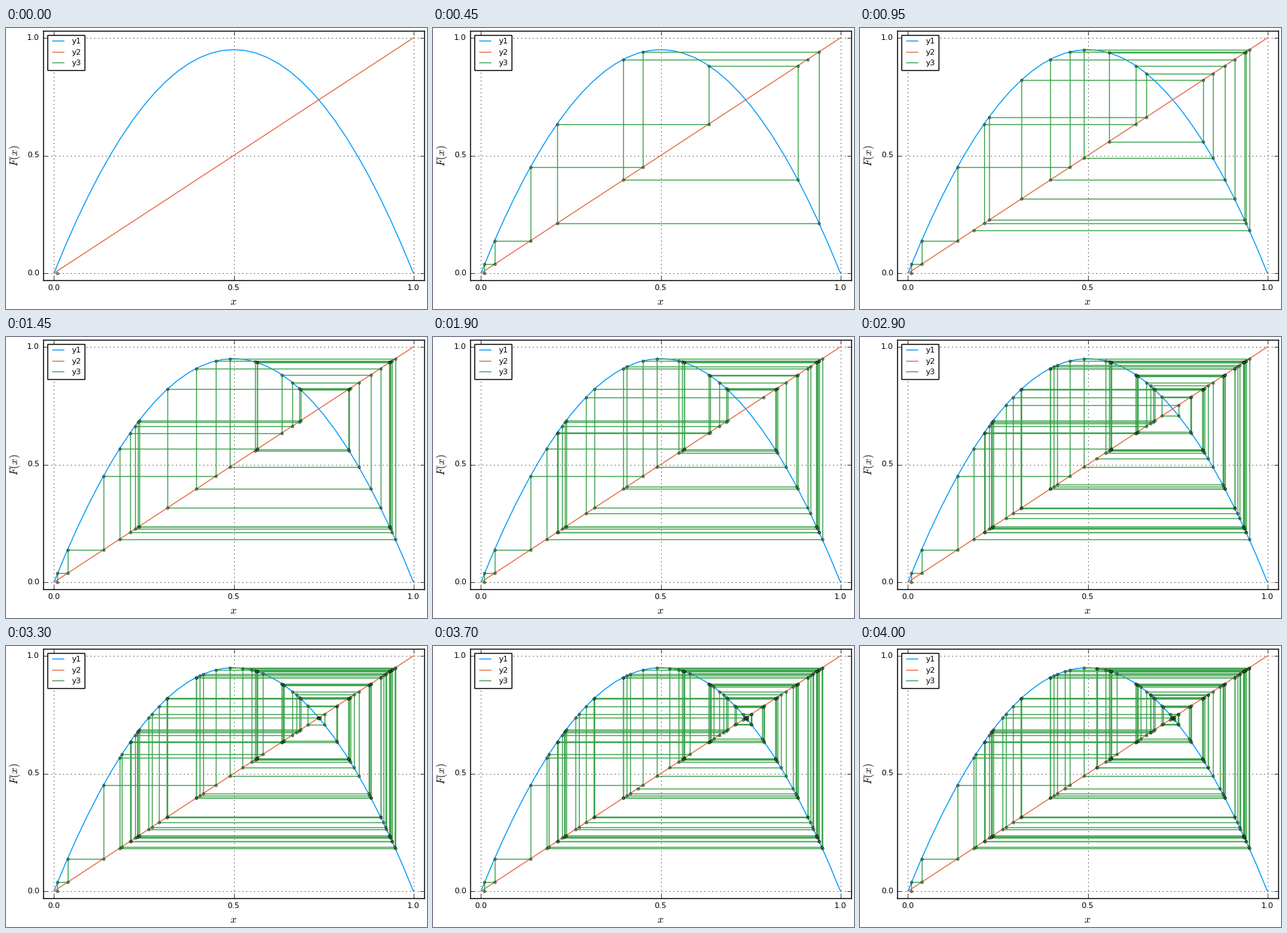
A matplotlib script for the animation above (4050 ms loop, 600 by 400 pixels).

```python
import numpy as np
import matplotlib.pyplot as plt
from matplotlib.animation import FuncAnimation

R, X0 = 3.8, 0.01
STEPS = 81
BLUE, ORANGE, GREEN = "#009AFA", "#E36F47", "#3EA44E"


def logistic(x):
    return R * x * (1 - x)


def cobweb(x, steps):
    """Vertices of the staircase between the map and the diagonal."""
    points = [(x, 0.0)]
    for _ in range(steps):
        y = logistic(x)
        points += [(x, y), (y, y)]
        x = y
    return np.array(points)


plt.style.use("classic")
plt.rcParams.update({
    "font.family": "DejaVu Sans",
    "xtick.labelsize": 8,
    "ytick.labelsize": 8,
    "axes.labelsize": 11,
    "legend.fontsize": 8,
    "axes.axisbelow": True,
})

fig = plt.figure(figsize=(6, 4), dpi=100, facecolor="white")
ax = fig.add_axes([53 / 600, 41 / 400, 543 / 600, 355 / 400])

grid_x = np.linspace(0, 1, 33)
ax.plot(grid_x, logistic(grid_x), color=BLUE, lw=1, label="y1")
ax.plot([0, 1], [0, 1], color=ORANGE, lw=1, label="y2")
web, = ax.plot([], [], color=GREEN, lw=1, label="y3")
dots = ax.scatter([], [], s=4 * 100 / 72, linewidths=1, zorder=3,
                  facecolors=[(0.24, 0.64, 0.31, 0.5)],
                  edgecolors=[(0, 0, 0, 0.5)])

ticks = [0, 0.5, 1]
labels = [f"{t:.1f}" for t in ticks]
ax.set_xticks(ticks, labels)
ax.set_yticks(ticks, labels)
ax.set_xlim(-0.03, 1.03)
ax.set_ylim(-0.03, 1.03)
ax.set_xlabel("$x$")
ax.set_ylabel("$F(x)$")
ax.grid(True)
ax.legend(loc="upper left")

path = cobweb(X0, STEPS - 1)


def update(step):
    shown = path[:2 * step + 1]
    web.set_data(shown[:, 0], shown[:, 1])
    dots.set_offsets(shown)
    return web, dots


anim = FuncAnimation(fig, update, frames=STEPS, interval=50,
                     init_func=lambda: update(0), repeat=True)
plt.show()
```
